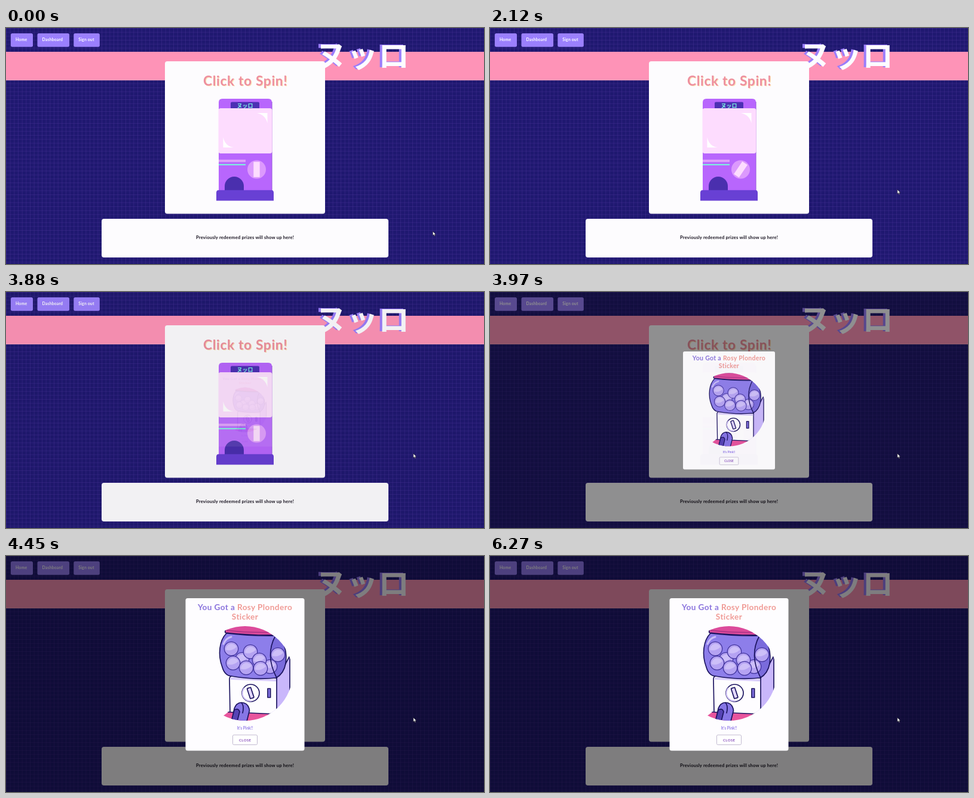
An HTML page that plays this animation: 800x397 px, repeating every 6.58 s.

```html
<!DOCTYPE html>
<html lang="en">
<head>
<meta charset="utf-8">
<title>Capsule machine</title>
<style>
html, body { margin: 0; width: 100%; height: 100%; overflow: hidden; background: #1f1870; }
svg { display: block; width: 100%; height: 100%; }
text { font-family: Lato, "Open Sans", sans-serif; font-weight: 700; }
.kana { font-family: "Noto Sans CJK JP", "Noto Sans CJK", sans-serif; font-weight: 700; }
.mid { text-anchor: middle; }
.ink { stroke: #1c1460; stroke-width: 1.7; stroke-linejoin: round; stroke-linecap: round; }
</style>
</head>
<body>
<svg viewBox="0 0 800 397" preserveAspectRatio="none">
  <defs>
    <pattern id="grid" width="6.667" height="6.667" patternUnits="userSpaceOnUse">
      <path d="M0 .4H6.667M.4 0V6.667" stroke="#4a349a" stroke-width=".8" stroke-opacity=".5"/>
    </pattern>
    <clipPath id="round"><circle cx="400" cy="197.5" r="79.5"/></clipPath>
    <clipPath id="dome"><path id="domeShape" d="M369 130C357 142 354 166 362 187Q366 201 377 202Q418 209 452 205Q465 198 468 181Q472 153 456 134Q410 135 369 130Z"/></clipPath>
  </defs>

  <rect width="800" height="397" fill="#1f1870"/>
  <rect width="800" height="397" fill="url(#grid)"/>
  <rect y="40" width="800" height="48" fill="#fe93b7"/>
  <path d="M0 87.7H800" stroke="#ffb3cb" stroke-width=".6"/>
  <g id="nav"></g>

  <g font-size="52" letter-spacing=".5">
    <text class="kana" x="514" y="64.5" fill="#9a7dfb">ヌッロ</text>
    <text class="kana" x="518" y="66" fill="#fdfcff">ヌッロ</text>
  </g>

  <rect x="266" y="56" width="268" height="256.5" rx="4" fill="#fdfcfe"/>
  <rect x="160" y="321" width="480" height="65" rx="4" fill="#fdfcfe"/>
  <g class="mid" font-size="22.5" letter-spacing=".75">
    <text x="401.8" y="98.3" fill="#fbe2b8">Click to Spin!</text>
    <text x="400.7" y="97.3" fill="#ee8f9f">Click to Spin!</text>
  </g>
  <text class="mid" x="400" y="354.8" font-size="7.6" letter-spacing=".2" fill="#17121f">Previously redeemed prizes will show up here!</text>

  <g id="machine">
    <path d="M356 140V125Q356 119 362 119H439Q445 119 445 125V140Z" fill="#b866fd"/>
    <rect x="376" y="124.5" width="48" height="14" rx="2" fill="#4c30b4"/>
    <text class="kana mid" x="400" y="133.5" font-size="9" fill="#7df6e2">ヌッロ</text>
    <rect x="356" y="205" width="89" height="70" fill="#b866fd"/>
    <path d="M445.2 124V273" stroke="#8446cf" stroke-width=".7"/>
    <rect x="355.5" y="135" width="90" height="76" rx="4" fill="#fddcfe"/>
    <path d="M420 143H437.5V160Q434 146 420 143ZM363.5 184V201H381Q367 199 363.5 184Z" fill="#fff"/>
    <rect x="356" y="221.5" width="45" height="4" fill="#dfa0fb"/>
    <rect x="356" y="228.8" width="45" height="2.2" fill="#7df0df"/>
    <circle cx="419.5" cy="238" r="15.5" fill="#dc99fd"/>
    <rect id="knob" x="414.3" y="225.2" width="10.4" height="25.6" fill="#fddcfe"/>
    <path d="M366 274V266A16 16 0 0 1 398 266V274Z" fill="#4a2fae"/>
    <path d="M352 290.5V277Q352 272.7 356 272.7H444Q448 272.7 448 277V290.5Z" fill="#6840d4"/>
  </g>

  <rect id="shade" width="800" height="397" opacity="0"/>

  <g id="modal" opacity="0">
    <rect x="300.5" y="71" width="199" height="256.5" rx="3.5" fill="#fefdff"/>
    <g class="mid" font-size="13.6" letter-spacing=".4" fill="#8b74dd">
      <text x="400" y="91">You Got a <tspan fill="#f09a95">Rosy Plondero</tspan></text>
      <text x="400" y="107.2" fill="#f09a95">Sticker</text>
    </g>
    <g clip-path="url(#round)">
      <path class="ink" d="M453 205L468 181L475 168V278H440Z" fill="#c9b7fb"/>
      <path class="ink" d="M374 207Q374 202 379 202L453 205.5V268L375 264Z" fill="#fefdff"/>
      <path d="M376 204L452 207V211L376 208Z" fill="#d9cdfb"/>
      <path d="M362 270L372 262.5L442 265.5L438 280H362Z" fill="#e8559d"/>
      <path class="ink" d="M372 262.5L442 265.5" fill="none"/>
      <path d="M442 266.5L454 268L480 240V280H436Z" fill="#fefdff"/>
      <use href="#domeShape" fill="#8d7eea"/>
      <g clip-path="url(#dome)">
        <path d="M451 130Q436 168 454 210H480V130Z" fill="#7a6bdc"/>
        <g id="balls"></g>
        <path d="M364 148Q368 138 377 136" fill="none" stroke="#c9bdf8" stroke-width="3" stroke-linecap="round"/>
      </g>
      <use href="#domeShape" class="ink" fill="none"/>
      <path class="ink" d="M451 134Q433 167 453 205" fill="none"/>
      <path class="ink" d="M367 129Q365 121 376 117H452L457 133Q410 134 367 129Z" fill="#dc4b9b"/>
      <path d="M369 125Q410 130 454 128" fill="none" stroke="#a83286" stroke-width="1.4"/>
      <circle class="ink" cx="409.5" cy="230.5" r="14.5" fill="#fefdff"/>
      <path d="M399 222A13 13 0 0 0 411 243.5" fill="none" stroke="#d5c8fb" stroke-width="2"/>
      <rect class="ink" x="406" y="221.5" width="6.5" height="18" rx="1" fill="#e1d7fd" transform="rotate(-18 409.3 230.5)"/>
      <rect class="ink" x="438" y="223" width="4.6" height="15" fill="#8474e5"/>
      <path class="ink" d="M378 278L382 257Q385 247 394 246.5Q406 247 407.5 260L403 278Z" fill="#8676e5"/>
      <path class="ink" d="M382 259Q389 255 391 262L387 278H377Z" fill="#5644b5"/>
      <path class="ink" d="M394 247Q399 252 396 264" fill="none"/>
    </g>
    <text class="mid" x="400" y="291.5" font-size="6.5" fill="#927be8">It's Pink!!</text>
    <rect x="379.5" y="301" width="41" height="16.5" rx="2" fill="#fff" stroke="#bcb3cc" stroke-width=".9"/>
    <text class="mid" x="400.2" y="311.8" font-size="6" letter-spacing=".4" fill="#8a50bd">CLOSE</text>
  </g>

  <g id="pointer" stroke="#15131c" stroke-width=".6" stroke-linejoin="round" fill="#fff">
    <path id="arrow" d="M0 0V7L1.6 5.6L2.8 8.1L4 7.5L2.8 5.2H5Z"/>
    <path id="hand" d="M-.9 6V.6Q0-.6 .9 .6V3.8Q2 3 2.7 4.1Q3.8 3.5 4.3 4.6Q5.4 4.4 5.4 5.6V8.2L4.3 11.2H-.3L-3 7.2Q-2.9 5.6-.9 7Z"/>
  </g>
</svg>
<script>
const LOOP = 6580;
const SPIN = { start: 1280, length: 2450 };
const $ = id => document.getElementById(id);
const clamp = v => Math.max(0, Math.min(1, v));
const span = (t, start, length) => clamp((t - start) / length);
const smooth = p => p * p * (3 - 2 * p);
const easeOut = p => 1 - (1 - p) ** 2;
const mix = (a, b, p) => a + (b - a) * p;

// cubic-bezier(.25, .1, .25, 1)
function ease(p) {
  const curve = (u, a, b) => 3 * a * u * (1 - u) ** 2 + 3 * b * u * u * (1 - u) + u ** 3;
  let lo = 0, hi = 1;
  for (let i = 0; i < 20; i++) {
    const mid = (lo + hi) / 2;
    if (curve(mid, .25, .25) < p) lo = mid; else hi = mid;
  }
  return curve(lo, .1, 1);
}

$("nav").innerHTML = [["Home", 8, 37], ["Dashboard", 52.5, 53.5], ["Sign out", 113.3, 43.5]]
  .map(([label, x, w]) => `<rect x="${x}" y="9" width="${w}" height="22.7" rx="2.5" fill="#9b80fd"/>
    <text x="${x + 8}" y="22.3" font-size="6.9" letter-spacing=".15" fill="#fff">${label}</text>`).join("");

$("balls").innerHTML = [[455, 166], [377, 156], [395, 174], [409, 161], [442, 186], [424, 175], [380, 180], [426, 189], [402, 188]]
  .map(([x, y]) => `<circle cx="${x}" cy="${y}" r="11.7" fill="#b5a3f2" stroke="#43359f" stroke-width="1.3"/>
    <path d="M${x - 9} ${y + 2}Q${x} ${y + 5} ${x + 9} ${y - 3}A9.5 9.5 0 0 0 ${x - 9} ${y + 2}Z" fill="#cdbff8"/>`).join("");

function pointerAt(t) {
  const go = smooth(span(t, 30, 700));
  const back = smooth(span(t, 1300, 700));
  return [mix(mix(714.3, 414.8, go), 681.8, back), mix(mix(342, 230.5, go), 271.8, back)];
}

function draw(t) {
  const turn = 360 * ease(span(t, SPIN.start, SPIN.length));
  $("knob").setAttribute("transform", `rotate(${turn} 419.5 238)`);

  const [x, y] = pointerAt(t);
  const over = x > 352 && x < 448 && y > 119 && y < 290;
  $("pointer").setAttribute("transform", `translate(${x} ${y})`);
  $("arrow").style.display = over ? "none" : "";
  $("hand").style.display = over ? "" : "none";

  const scale = mix(.4, 1, easeOut(span(t, 3863, 280)));
  $("shade").setAttribute("opacity", .5 * span(t, 3871, 115));
  $("modal").setAttribute("opacity", span(t, 3874, 101));
  $("modal").setAttribute("transform", `translate(400 199) scale(${scale}) translate(-400 -199)`);
}

function tick() {
  draw(performance.now() % LOOP);
  requestAnimationFrame(tick);
}
tick();
</script>
</body>
</html>
```
